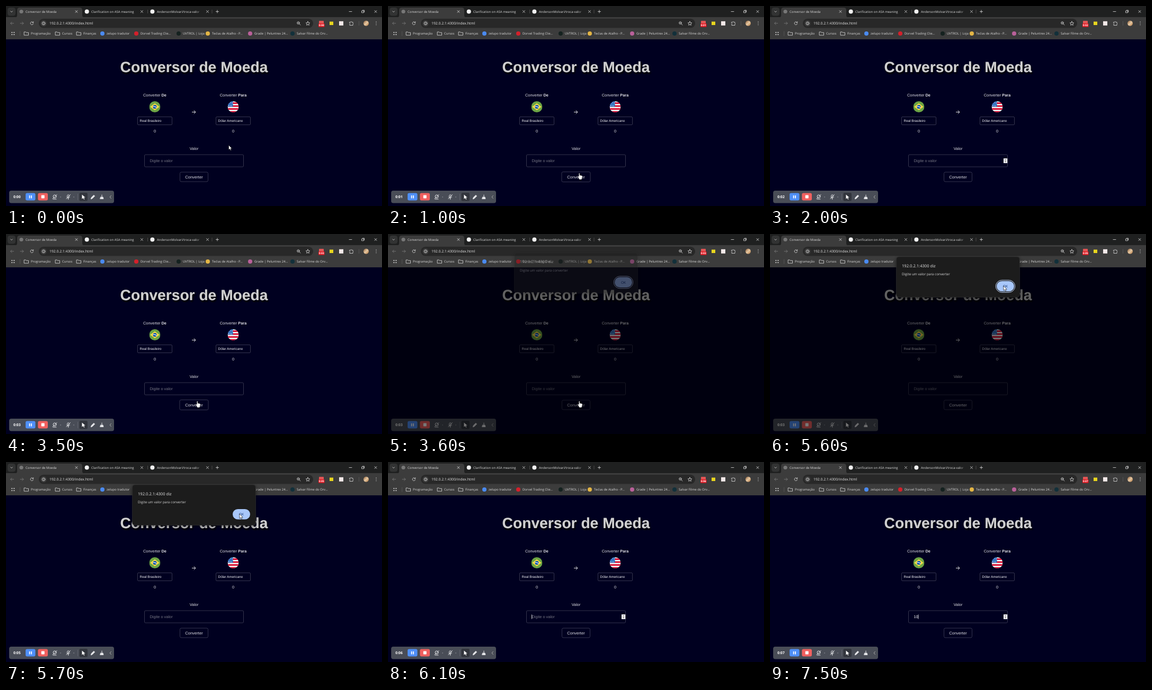
An HTML page for the animation above (8 s loop, 710 px wide and 378 px high).

```html
<!DOCTYPE html>
<html lang="pt-BR">
<head>
<meta charset="utf-8">
<title>Conversor de Moeda</title>
<style>
html, body { margin: 0; width: 100%; height: 100%; overflow: hidden; background: #000020; }
svg { display: block; }
text { text-rendering: geometricPrecision; white-space: pre; }
.ui { font: 6px "Open Sans", "Noto Sans", sans-serif; fill: #dcdcdc; }
.page { font: 7.4px "Liberation Sans", Arial, sans-serif; fill: #dedee2; }
.mid { text-anchor: middle; }
.bold { font-weight: 700; }
.line { fill: none; stroke: #d0d0d0; stroke-width: .9; stroke-linecap: round; stroke-linejoin: round; }
.dim { stroke: #777; }
.box { fill: none; stroke: #43435a; stroke-width: .8; }
.tool { fill: none; stroke: #e4e5e8; stroke-width: 1; stroke-linecap: round; stroke-linejoin: round; }
h1 { margin: 0; }
</style>
</head>
<body>
<svg id="stage" width="710" height="378" viewBox="0 0 710 378">
  <defs>
    <clipPath id="round"><circle cx="256" cy="256" r="256"/></clipPath>
    <linearGradient id="tabFade"><stop offset="0" stop-color="#1f2020" stop-opacity="0"/><stop offset="1" stop-color="#1f2020"/></linearGradient>
    <linearGradient id="portrait" x2="1" y2="1"><stop offset="0" stop-color="#8a5a34"/><stop offset=".5" stop-color="#e6c9a4"/><stop offset="1" stop-color="#b4763c"/></linearGradient>
    <filter id="titleShadow" x="-10%" y="-30%" width="120%" height="180%"><feDropShadow dx="1.5" dy="3" stdDeviation="1.6" flood-color="#000"/></filter>
    <filter id="dialogShadow" x="-10%" y="-20%" width="120%" height="150%"><feDropShadow dx="0" dy="2" stdDeviation="3" flood-color="#000" flood-opacity=".55"/></filter>
  </defs>

  <rect width="710" height="378" fill="#000020"/>

  <!-- page -->
  <g class="page">
    <text class="mid bold" x="355" y="125" style="font-size:28.2px;fill:#cfcfcf" filter="url(#titleShadow)">Conversor de Moeda</text>
    <text class="mid" x="281" y="171">Converter <tspan class="bold">De</tspan></text>
    <text class="mid" x="429" y="171">Converter <tspan class="bold">Para</tspan></text>

    <g transform="translate(270.5 180) scale(.041)"><g clip-path="url(#round)">
      <rect width="512" height="512" fill="#6da544"/>
      <path d="M256 100 467 256 256 412 45 256Z" fill="#ffda44"/>
      <circle cx="256" cy="256" r="88" fill="#0052b4"/>
      <path d="M172 244Q266 228 336 292" fill="none" stroke="#f0f0f0" stroke-width="34"/>
    </g></g>
    <g transform="translate(418.5 180) scale(.041)"><g clip-path="url(#round)">
      <rect width="512" height="512" fill="#f0f0f0"/>
      <path d="M0 56h512v66H0zM0 189h512v67H0zM0 323h512v67H0zM0 456h512v56H0z" fill="#d80027"/>
      <rect width="245" height="256" fill="#0052b4"/>
      <path d="M130 60H240M70 125H240M30 190H240M20 240H240" stroke="#f0f0f0" stroke-width="34" stroke-dasharray="34 34"/>
    </g></g>

    <path d="M351.5 200.5h6M355 197.5l3 3-3 3" class="tool" stroke-width="1.2"/>
    <rect class="box" x="248.5" y="209.5" width="65" height="15" rx="1.5"/>
    <rect class="box" x="396.5" y="209.5" width="65" height="15" rx="1.5"/>
    <g style="font-size:6.3px;fill:#f4f4f6">
      <text x="252.6" y="219.3">Real Brasileiro</text>
      <text x="400.6" y="219.3">Dólar Americano</text>
    </g>
    <text class="mid" x="281" y="239">0</text>
    <text class="mid" x="429" y="239">0</text>
    <text class="mid" x="355" y="271.5">Valor</text>

    <rect class="box" x="261.5" y="281" width="187" height="23" rx="2"/>
    <text id="amount" x="271.5" y="295"></text>
    <rect id="caret" y="288.3" width=".8" height="8.4" fill="#fff"/>
    <g id="spinner">
      <rect x="441" y="288" width="7.2" height="9" fill="#f3f3f3"/>
      <path d="M443 291.6l1.6-1.8 1.6 1.8zM443 293.6l1.6 1.8 1.6-1.8z" fill="#555"/>
    </g>
    <rect id="button" class="box" rx="2.5"/>
    <text class="mid" x="355" y="325.6" style="font-size:7.6px">Converter</text>
  </g>

  <!-- recorder bar -->
  <rect x="6" y="349" width="198" height="23.5" rx="4" fill="#494d57"/>
  <text id="clock" class="ui bold" x="14" y="363.2" style="font-size:6.8px;fill:#fff"></text>
  <rect x="37" y="353.5" width="18.5" height="14" rx="3" fill="#4f8ff7"/>
  <path d="M44.6 358v5.6M48 358v5.6" stroke="#fff" stroke-width="1.8"/>
  <rect x="60.3" y="353.5" width="18.7" height="14" rx="3" fill="#f0605f"/>
  <rect x="66.7" y="357.6" width="6" height="6" rx=".8" fill="#fff"/>
  <g class="tool">
    <circle cx="92" cy="360" r="3"/><path d="M89 365h6M88 364.5l8-8"/>
    <path d="M116 357.500q1.500-2 3 0v3q-1.500 2-3 0zM114.500 361q3 4 6 0M117.700 363v2.500M114 364.500l7.500-8"/>
    <path d="M103 361h.1M128 361h.1"/>
    <path d="M160.500 364.500l.7-2.500 4.600-4.600 1.800 1.800-4.600 4.600z" fill="#e4e5e8"/>
    <path d="M181 357v3M179 361h4l1 3.500h-6z" fill="#e4e5e8"/>
    <path d="M198.500 358.300l-2.500 2.700 2.500 2.700" stroke="#aaa"/>
  </g>
  <path d="M135.500 355v12" stroke="#6a6e78" stroke-width=".7"/>
  <rect x="138.500" y="353" width="15.500" height="15.500" rx="2.500" fill="#32353d"/>
  <path d="M143.500 356.500v8.200l2.200-2 1.500 3 1.200-.6-1.500-3h2.800z" fill="#fff"/>

  <rect id="scrim" y="63" width="710" height="315" fill="#000" opacity=".53"/>

  <!-- browser frame -->
  <rect width="710" height="22" fill="#1f2020"/>
  <rect y="21" width="710" height="42" fill="#3c3c3c"/>
  <path d="M17 21.500q4 0 4-4V8q0-5 5-5H139q5 0 5 5v9.500q0 4 4 4z" fill="#3c3c3c"/>
  <rect x="3" y="3" width="15" height="15.500" rx="4.500" fill="#323333"/>
  <rect x="62" y="24" width="518" height="17.500" rx="8.700" fill="#282828"/>
  <circle cx="71" cy="32.800" r="5.800" fill="#3c3c3c"/>
  <g class="line">
    <path d="M8.700 9.800l1.800 1.800 1.800-1.800"/>
    <path d="M396.500 10.500h5M399 8v5M648 10.500h5"/>
    <path d="M672 9.200h3.500v3.500H672zM673.200 8h3.500v3.500"/>
    <path class="dim" d="M14.500 32.700h-6M11 30.200l-2.500 2.500 2.500 2.500M27 32.700h6M30.500 30.200l2.500 2.500-2.500 2.500"/>
    <path d="M51.300 31.200a2.800 2.800 0 1 0 .3 2.200M51.700 29.600v1.900h-1.900"/>
    <circle cx="71" cy="32.800" r="2.800"/><path d="M71 32.600v1.400M71 31.300h.1"/>
    <circle cx="552" cy="32" r="2.300"/><path d="M553.800 33.800l2.200 2.200M551 32h2"/>
    <path d="M570 29.200l1.100 2.400 2.600.3-2 1.800.6 2.600-2.300-1.300-2.300 1.300.6-2.600-2-1.800 2.600-.3z"/>
    <path d="M649 30.500h2q.9-2.500 1.800 0h2.200v2q2 .9 0 1.800v2.200h-6v-2.200q1.800-.9 0-1.800z"/>
    <path d="M699 30h.1M699 32.800h.1M699 35.600h.1" stroke-width="1.300"/>
    <path d="M11 49.500h1v1h-1zM15 49.500h1v1h-1zM11 53.500h1v1h-1zM15 53.500h1v1h-1z"/>
  </g>
  <path d="M26.500 47.500v9M666.500 28.500v8.500M389 7v7M267.500 7v7" stroke="#5c5c5c" stroke-width=".7"/>
  <circle cx="29" cy="10.500" r="3.600" fill="#777"/>
  <circle cx="152.700" cy="10.500" r="4" fill="#f2f2f2"/>
  <circle cx="276.400" cy="10.500" r="4" fill="#f2f2f2"/>
  <g class="ui">
    <text x="37" y="12.700">Conversor de Moeda</text>
    <text x="161" y="12.700">Clarification on ASA meaning</text>
    <text x="285" y="12.700">AndersonMolvari/troca-valor</text>
    <text x="82" y="35.200" style="font-size:6.8px;fill:#e6e6e6">192.0.2.1:4300/index.html</text>
  </g>
  <rect x="358" y="5" width="13" height="12" fill="url(#tabFade)"/>
  <g id="bookmarks" class="ui"></g>
  <g id="crosses" class="line"></g>
  <rect x="591" y="28" width="9" height="6" rx="1" fill="#e25555"/>
  <rect x="590" y="33" width="11.500" height="6.800" rx="1.300" fill="#e0141e"/>
  <text id="badge" class="ui mid bold" x="595.700" y="38.300" style="font-size:5px;fill:#fff"></text>
  <rect x="611" y="29.500" width="7" height="6.500" fill="#e8d51e"/>
  <rect x="629" y="28.800" width="8" height="8" fill="#f4e9e9"/>
  <circle cx="680" cy="32.800" r="5" fill="url(#portrait)"/>

  <!-- alert -->
  <g id="dialog" class="ui">
    <rect x="238.500" y="43" width="233" height="76.500" rx="5" fill="#1f1f1f" stroke="#333" stroke-width=".5" filter="url(#dialogShadow)"/>
    <text x="249" y="62.700" style="font-size:7.600px;font-weight:500;fill:#e8e8e8">192.0.2.1:4300 diz</text>
    <text x="249" y="78" style="font-size:6.400px">Digite um valor para converter</text>
    <rect id="ring" x="426.300" y="87.300" width="36.400" height="23" rx="11.500" fill="none" stroke="#c4d8fb" stroke-width="1"/>
    <rect x="428" y="89" width="33" height="19.600" rx="9.800" fill="#a8c7fa"/>
    <text class="mid" x="444.500" y="101.100" style="font-size:6.400px;fill:#0b2f6b">OK</text>
  </g>

  <!-- pointers, hot spot at 0,0 -->
  <path id="arrow" d="M0 0v8.800l2-1.800 1.400 3 1.500-.7-1.400-2.900h2.700z" fill="#fff" stroke="#000" stroke-width=".6"/>
  <path id="hand" d="M-1.700-5.500q1-1.300 1.800 0v3.200l4 .9q1.200.5.900 2L4.200 4.200 3.500 6H-.7L-4-.1q.2-1.500 2.300.4z" fill="#fff" stroke="#000" stroke-width=".5"/>
</svg>
<script>
const LOOP = 8000, STEP = 100;
const el = id => document.getElementById(id);
const show = (id, on) => { el(id).style.display = on ? "" : "none"; };
const clamp = v => Math.max(0, Math.min(1, v));
const inside = (p, x1, y1, x2, y2) => p.x >= x1 && p.x <= x2 && p.y >= y1 && p.y <= y2;

// text x, label, icon colour (none = folder)
const bookmarks = [
  [47, "Programação"], [106, "Cursos"], [146, "Finanças"],
  [190, "zelupo tradutor", "#4a8af0"], [254, "Dorvel Trading Clie...", "#d3202b"],
  [334, "UVTROL | Loja", "#14211f"], [389, "Teclas de Atalho - P...", "#e3b545"],
  [469, "Grade | Peluntrex 24...", "#b9609a"], [549, "Salvar Filme do Orv...", "#12303a"]
];
el("bookmarks").innerHTML = bookmarks.map(([x, label, color]) =>
  (color ? `<circle cx="${x - 8}" cy="52" r="4" fill="${color}"/>`
         : `<path class="line" d="M${x - 12.5} 49h2.800l1 1.200h4.200v5h-8z"/>`) +
  `<text x="${x}" y="54.200">${label}</text>`).join("");
el("crosses").innerHTML = [133, 256.5, 380.5, 698].map(x =>
  `<path d="M${x - 2} 8.500l4 4M${x + 2} 8.500l-4 4"/>`).join("");

// time, x, y
const path = [
  [0, 420.5, 263], [700, 362, 322], [1100, 362, 322], [1200, 357, 298],
  [2900, 357, 298], [3300, 362, 322], [4800, 362, 322], [5600, 441, 98],
  [5700, 441, 98], [6000, 352, 293], [LOOP, 352, 293]
];

function pointerAt(t) {
  const i = path.findIndex(k => k[0] > t);
  const [t0, x0, y0] = path[i - 1], [t1, x1, y1] = path[i];
  const u = (t - t0) / (t1 - t0), e = u * u * (3 - 2 * u);
  return { x: x0 + (x1 - x0) * e, y: y0 + (y1 - y0) * e };
}

function draw(t) {
  const seconds = Math.floor(t / 1000);
  const modal = t >= 3600 && t < 5700;
  const p = pointerAt(t);
  const overInput = !modal && inside(p, 261, 281, 449, 304);
  const overButton = !modal && inside(p, 328, 314, 382, 333);
  const hand = overButton || (modal && t <= 4800);

  el("badge").textContent = "0:0" + seconds;
  el("clock").textContent = "0:0" + (modal ? 3 : seconds);

  const typed = t >= 7500 ? "10" : t >= 7000 ? "1" : "";
  el("amount").textContent = typed || "Digite o valor";
  el("amount").style.fill = typed ? "#f0f0f0" : "#777784";
  el("caret").setAttribute("x", 271.3 + typed.length * 4.12);
  show("caret", (t >= 6000 && t < 6500) || typed);
  show("spinner", overInput);

  const grow = overButton ? .5 : 0, button = el("button");
  button.setAttribute("x", 328.5 - grow);
  button.setAttribute("y", 314 - grow);
  button.setAttribute("width", 53 + 2 * grow);
  button.setAttribute("height", 18 + 2 * grow);

  const shown = t < 5800 ? clamp((t - 3520) / 200) : t < 5900 ? .4 : 0;
  show("dialog", t >= 3600 && shown > 0);
  el("dialog").setAttribute("opacity", shown);
  el("dialog").setAttribute("transform", `translate(0 ${-12.5 * (1 - shown)})`);
  show("ring", modal);
  show("scrim", modal);

  show("hand", hand);
  show("arrow", !hand && !overInput);
  for (const id of ["hand", "arrow"]) el(id).setAttribute("transform", `translate(${p.x} ${p.y})`);
}

function frame() {
  const t = performance.now() % LOOP;
  draw(Math.floor(t / STEP) * STEP);
  requestAnimationFrame(frame);
}
frame();
</script>
</body>
</html>
```
